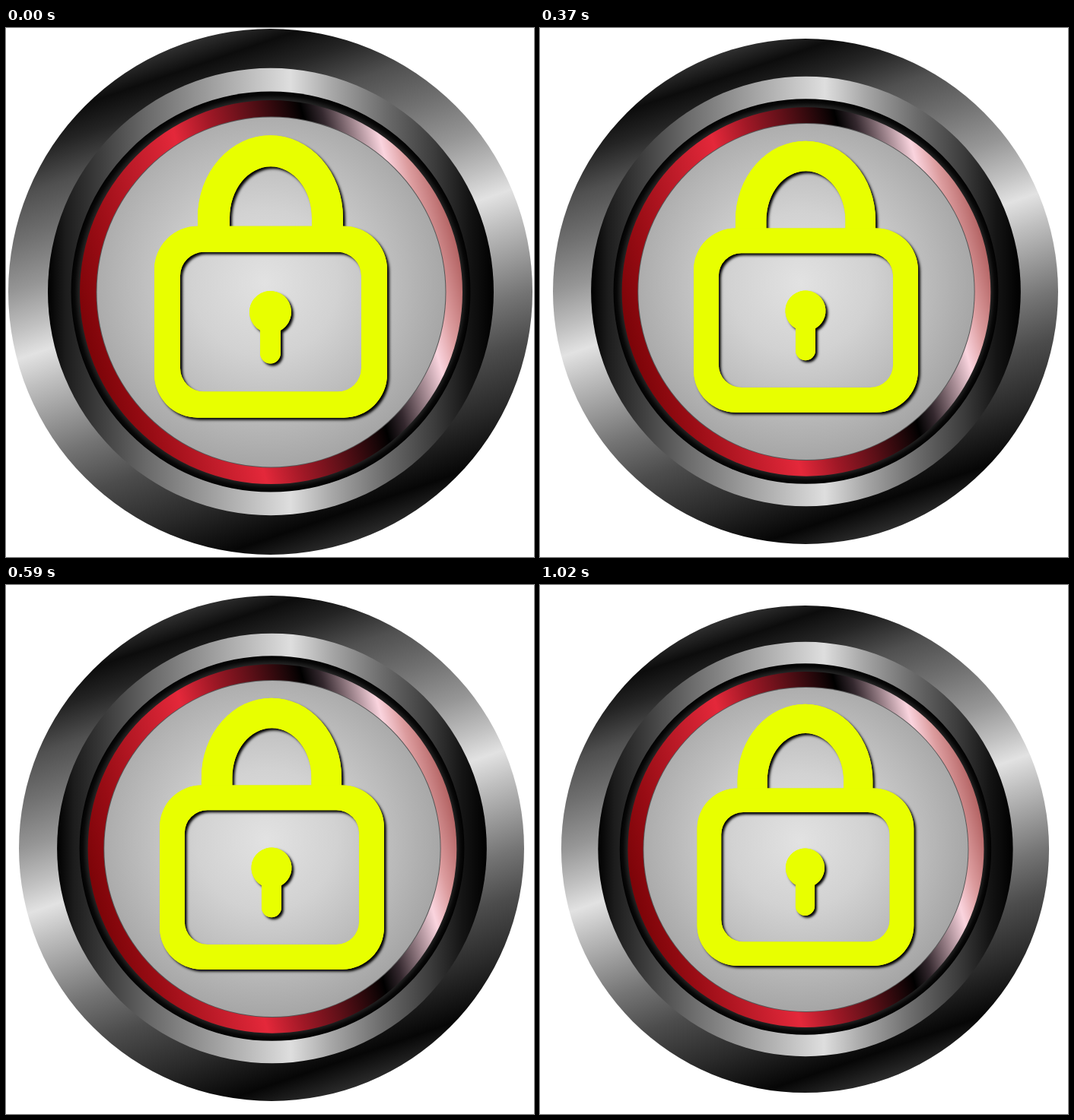
Animation, 694 px wide and 696 px high, one loop 1210 ms. Source, as an HTML page with a canvas:

```html
<!DOCTYPE html>
<html lang="en">
<head>
<meta charset="utf-8">
<title>Pulsing lock button</title>
<style>
  html, body { margin: 0; width: 100%; height: 100%; overflow: hidden; background: #fff; }
  canvas { display: block; }
</style>
</head>
<body>
<canvas id="stage" width="694" height="696"></canvas>
<script>
const ctx = document.getElementById('stage').getContext('2d');
const LOOP = 1210;
// Each pose holds until its end time, then jumps to the next.
const poses = [
  { end: 370, x: 347.5, y: 347, scaleX: 1, scaleY: 1.004 },
  { end: 740, x: 349, y: 346.5, scaleX: 0.9637, scaleY: 0.965 },
  { end: LOOP, x: 348.5, y: 347.5, scaleX: 0.9305, scaleY: 0.9305 }
];

// Gradient across the centre; stops are [signed distance, colour].
function linear(angle, radius, stops) {
  const dx = Math.cos(angle) * radius, dy = Math.sin(angle) * radius;
  const g = ctx.createLinearGradient(-dx, -dy, dx, dy);
  for (const [d, color] of stops) g.addColorStop((d / radius + 1) / 2, color);
  return g;
}

function radial(x, y, radius, stops) {
  const g = ctx.createRadialGradient(x, y, 0, x, y, radius);
  for (const [d, color] of stops) g.addColorStop(d, color);
  return g;
}

const rim = linear(1.24, 345, [
  [-345, '#303030'], [-312, '#0c0c0c'], [-275, '#242424'], [-226, '#505050'],
  [-170, '#707070'], [-110, '#969696'], [-60, '#c0c0c0'], [-24, '#e2e2e2'], [15, '#c0c0c0'],
  [65, '#989898'], [110, '#747474'], [170, '#4c4c4c'], [240, '#2a2a2a'], [305, '#060606'], [345, '#2c2c2c']
]);
const bevel = linear(0, 293, [
  [-293, '#000'], [-270, '#1c1c1c'], [-215, '#444'], [-160, '#6c6c6c'],
  [-90, '#989898'], [-30, '#bcbcbc'], [26, '#dedede'], [80, '#a8a8a8'], [150, '#6c6c6c'],
  [215, '#3c3c3c'], [260, '#141414'], [293, '#000']
]);
const groove = radial(0, 0, 263, [[0, '#222'], [0.957, '#222'], [0.98, '#080808'], [1, '#000']]);
const redRing = linear(-0.26, 251, [
  [-251, '#7c0408'], [-200, '#980c14'], [-130, '#c01c2a'], [-70, '#e4283a'],
  [-20, '#a01826'], [30, '#601018'], [80, '#1c0608'], [100, '#000'],
  [125, '#34282e'], [155, '#907880'], [190, '#fad4de'], [216, '#dc9c9e'], [251, '#b46464']
]);
const face = radial(-8, -12, 240, [[0, '#e2e2e2'], [0.4, '#d2d2d2'], [0.75, '#b9b9b9'], [1, '#a6a6a6']]);

function disc(radius, fill) {
  ctx.beginPath();
  ctx.arc(0, 0, radius, 0, Math.PI * 2);
  ctx.fillStyle = fill;
  ctx.fill();
}

const shackle = new Path2D();
shackle.ellipse(0, -97, 95.5, 108, 0, Math.PI, 0);
shackle.lineTo(95.5, -70);
shackle.lineTo(54.5, -70);
shackle.ellipse(0.5, -97, 54, 67, 0, 0, Math.PI, true);
shackle.lineTo(-53.5, -70);
shackle.lineTo(-95.5, -70);
shackle.closePath();

const body = new Path2D();
body.roundRect(-152.5, -86, 306, 251, 57);
body.roundRect(-118.5, -52, 238, 183, 31);

const keyhole = new Path2D();
const neck = Math.asin(13.5 / 27.5);
keyhole.arc(0, 26.5, 27.5, Math.PI / 2 + neck, Math.PI / 2 - neck);
keyhole.arc(0, 80.5, 13.5, 0, Math.PI);
keyhole.closePath();

// The second pass, without shadow, hides shadows that fall on the lock itself.
function drawLock(scale) {
  ctx.fillStyle = '#e8ff00';
  ctx.shadowOffsetX = ctx.shadowOffsetY = 3 * scale;
  ctx.shadowBlur = 3.5 * scale;
  for (const shadow of ['#000', 'transparent']) {
    ctx.shadowColor = shadow;
    for (const part of [shackle, body, keyhole]) ctx.fill(part, 'evenodd');
  }
}

function draw({ x, y, scaleX, scaleY }) {
  ctx.fillStyle = '#fff';
  ctx.fillRect(0, 0, 694, 696);
  ctx.save();
  ctx.translate(x, y);
  ctx.scale(scaleX, scaleY);
  disc(344.5, rim);
  ctx.translate(0.5, 0);
  disc(293, bevel);
  disc(262.5, groove);
  ctx.translate(0.5, 0.5);
  disc(251.5, redRing);
  disc(230, '#555');
  disc(229, face);
  ctx.translate(-1, -0.5);
  drawLock(scaleX);
  ctx.restore();
}

function tick() {
  const time = performance.now() % LOOP;
  draw(poses.find(pose => time < pose.end));
  requestAnimationFrame(tick);
}
tick();
</script>
</body>
</html>
```
